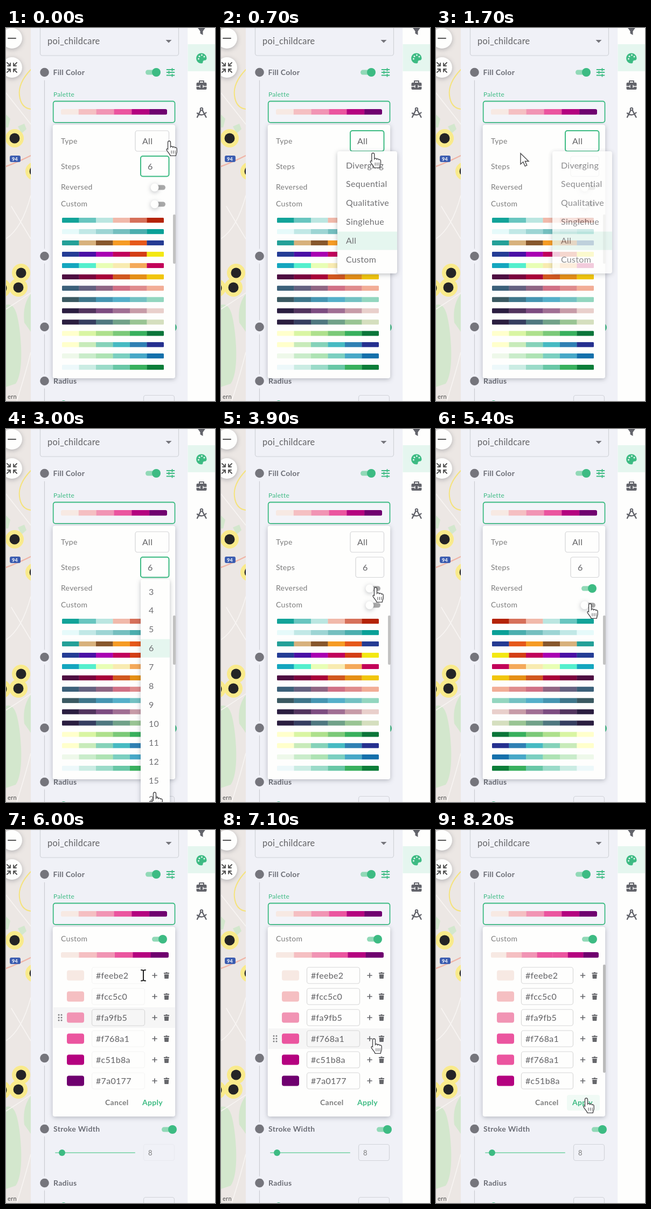
Recreate the animation shown at these times as an HTML page. Size 388x690 px, loop 8.4 s.

```html
<!DOCTYPE html>
<html lang="en">
<head>
<meta charset="utf-8">
<title>Palette picker</title>
<style>
html, body { margin: 0; width: 100%; height: 100%; overflow: hidden; background: #fefefd; }
svg { display: block; width: 388px; height: 690px; font: 16px Lato, "Open Sans", sans-serif; letter-spacing: .3px; }
.card { fill: #fefefd; filter: drop-shadow(0 2px 4px rgba(40, 45, 60, .3)); }
.line { fill: none; stroke-linecap: round; stroke-linejoin: round; }
</style>
</head>
<body>
<svg id="stage" viewBox="0 0 388 690"></svg>
<script>
const LOOP = 8400, STEP = 100;
const GREEN = '#3dbb83', MINT = '#e5f6ef', GREY = '#75757c', LABEL = '#7d7d7d', INK = '#626265', EDGE = '#d3d4d6';

const PINKS = ['#f7e9e3', '#f5bfc2', '#f194b4', '#eb559f', '#b4027f', '#6f006f'];
const HEX = ['#feebe2', '#fcc5c0', '#fa9fb5', '#f768a1', '#c51b8a', '#7a0177'];
const PALETTES = `
12a399 68c5bf bbe6e1 f1b9aa d6705a b42307
e6fafa c1e8e6 9dd5d4 75bfbf 4baeae 0aa097
24a098 d7b17c 87572c f69b24 e6581a 253b92
243c95 4a10a5 a900b2 c1005b d43e16 f3e813
14a6be 54efcd e8feb5 f8ebb1 f4a95a c20058
4d0d41 7a003d a80039 d0571f e58f15 f1c50c
3b6079 646180 8f6583 d07085 df8b8c f2ad96
3b5961 3e768a 4595b1 54afc9 73c1c2 93d6bf
2a1d3f 51335d 7c4b80 a06e93 c79ba7 e9cfcb
2a1d3f 363e60 4f777f 70a188 99c493 d5dfbe
ffffcc d9f5a3 aee08c 7bc978 38b05d 0b7539
ffffcc c8ebba 85d2b9 46bac2 2f80b3 25308f
eef8ea c9ecca aee3b4 7bcfc0 47a8c7 1470ab
edf8fa caece3 9adbc8 68c7a6 38b05d 0b7d38`
  .trim().split('\n').map(row => row.split(' ').map(c => '#' + c));

const attrs = o => Object.entries(o).map(([k, v]) => `${k}="${v}"`).join(' ');
const rect = (x, y, width, height, o) => `<rect ${attrs({ x, y, width, height, ...o })}/>`;
const circle = (cx, cy, r, fill) => `<circle ${attrs({ cx, cy, r, fill })}/>`;
const path = (d, o) => `<path ${attrs({ d, ...o })}/>`;
const stroke = (d, color, width) => path(d, { class: 'line', stroke: color, 'stroke-width': width });
const text = (x, y, s, size = 16, fill = INK, weight = 400) =>
  `<text ${attrs({ x, y, 'font-size': size, fill, 'font-weight': weight })}>${s}</text>`;
const group = (id, ...parts) => `<g id="${id}">${parts.join('')}</g>`;
const box = (x, y, w, h, color = EDGE, width = 1.2) =>
  rect(x, y, w, h, { rx: 4, fill: 'none', stroke: color, 'stroke-width': width });

function bar(x, y, w, h, colors, clip) {
  const s = w / colors.length;
  return `<g clip-path="url(#${clip})">` +
    colors.map((c, i) => rect(x + i * s, y, s + .3, h, { fill: c })).join('') + '</g>';
}
const toggle = (cx, cy, on) => on
  ? rect(cx - 14, cy - 4.5, 26, 9, { rx: 4.5, fill: '#91d9b7' }) + circle(cx + 6, cy, 8, GREEN)
  : rect(cx - 9, cy - 4.5, 22, 9, { rx: 4.5, fill: '#a9a9a9' }) +
    `<circle cx="${cx - 7}" cy="${cy}" r="7.5" class="card"/>`;
const marker = (x, y) => circle(x, y, 17, '#f9ea8b') + circle(x, y, 9.5, '#242426');

function mapView() {
  return rect(0, 0, 46, 690, { fill: '#ece7e4' }) +
    path('M0 512Q14 508 20 530T28 590Q30 640 18 658L0 664ZM46 492Q30 512 34 545L46 562ZM0 160l8 8-4 16H0ZM22 182l12-5 4 10-9 8Z', { fill: '#d3e7cd' }) +
    stroke('M0 120Q24 150 46 178M10 330L46 390M0 390Q30 370 46 310M0 520Q24 505 46 490M20 690Q36 640 46 600', '#f8f5f3', 1.5) +
    stroke('M46 77Q22 102 25 125T46 150', '#f5e37c', 2) +
    stroke('M0 256Q22 248 46 236', '#efb5a8', 2.5) +
    marker(16, 204) + marker(53, 265) + marker(28, 453) + marker(-8, 481) + marker(23, 480) +
    rect(7, 236, 20, 12, { rx: 3, fill: '#3c5db0' }) + text(11, 245.5, '94', 9, '#fff', 700) +
    text(3, 686, 'ern', 11, '#4c4c4c') +
    '<circle class="card" cx="11" cy="19" r="19"/><circle class="card" cx="11" cy="73" r="19"/>' +
    stroke('M4 19H18', '#555', 2) +
    stroke('M2 64l6 6m0-5v5H3M20 64l-6 6m0-5v5h5M2 82l6-6m0 5v-5H3M20 82l-6-6m0 5v-5h5', '#555', 2);
}

function sidebar() {
  const bullets = [82, 422, 553, 653].map(y => circle(71.5, y, 8.3, GREY)).join('');
  return rect(46, 0, 291.5, 690, { fill: '#f0f1f7' }) +
    box(63.5, -20, 257, 71, '#cfd1d8') + text(77, 30, 'poi_childcare', 16.3) +
    path('M296.500 22h11l-5.500 5.500z', { fill: GREY }) +
    stroke('M71.500 97V408M71.500 436V540M71.500 567V640M71.500 667V690', '#c9cad1', 1.2) + bullets +
    text(87.5, 87, 'Fill Color', 14, '#6c6e76', 700) + toggle(273, 82, true) +
    stroke('M298.500 77h14M298.500 82h14M298.500 87.500h14M308.500 74.800v4.400M302.500 79.800v4.400M308.500 85.300v4.400', GREEN, 1.8) +
    text(88, 127, 'Palette', 12, GREEN) +
    rect(87.7, 135.5, 225.8, 39.3, { rx: 4, fill: '#f3f4f9', stroke: GREEN, 'stroke-width': 1.8 }) +
    bar(102, 150, 197, 10.5, PINKS, 'clipField') +
    text(88, 558, 'Stroke Width', 14, '#6c6e76', 700) + toggle(303, 554, true) +
    stroke('M92 597H239', '#91d9b7', 2) + circle(104, 597, 6, GREEN) +
    group('sizeBox', box(255.5, 581.5, 57, 30, '#d2d4da')) + text(264, 602, '8', 13, LABEL) +
    text(88, 658, 'Radius', 14, '#6c6e76', 700) +
    circle(107, 695, 6, GREEN) + box(255.5, 679.5, 57, 30, '#d2d4da');
}

function rail() {
  return rect(337.5, 0, 51, 690, { fill: '#fefefd' }) + rect(337.5, 30, 51, 50, { fill: MINT }) +
    path('M354-3h18l-6.500 9v7l-5-3V6z', { fill: '#62636a' }) +
    path('M363 46.500c-13 0-13 19 0 19 3.500 0 2-3 3-4.500 1.500-2 6.500 0 6.500-5 0-5-4-9.500-9.500-9.500z', { fill: GREEN }) +
    [[357.5, 57], [359, 52.5], [363.5, 50], [368, 53]].map(p => circle(...p, 1.5, MINT)).join('') +
    rect(353.5, 101, 19, 13, { rx: 2, fill: '#62636a' }) +
    stroke('M359 101v-3h8v3', '#62636a', 2) +
    stroke('M353 108h7m6 0h7M360 106v4M366 106v4', '#fefefd', 1.3) +
    stroke('M361.500 152l-6.500 13M364.500 152l7 13M355 157.500q8 7 16.500-1', '#62636a', 2.4) +
    circle(363, 150, 3.2, '#62636a') + circle(363, 150, 1.2, '#fefefd');
}

function palettePopup() {
  const bars = flip => PALETTES.map((p, i) =>
    bar(104, 351 + i * 20.92, 189, 9.5, flip ? [...p].reverse() : p, 'clipList')).join('');
  return rect(86.7, 179, 227.5, 469, { rx: 4, class: 'card' }) +
    text(102, 214, 'Type', 14, LABEL) + box(240, 190, 62.5, 38) +
    group('typeFocus', box(240, 190, 62.5, 38, GREEN, 2)) + text(253, 215, 'All') +
    text(102, 261, 'Steps', 14, LABEL) + box(250, 237, 52.5, 37.5) +
    group('stepsFocus', box(250, 237, 52.5, 37.5, GREEN, 2)) + text(263, 261.5, '6') +
    text(102, 299, 'Reversed', 14, LABEL) + text(102, 330, 'Custom', 14, LABEL) +
    group('normal', toggle(283, 295, false), bars(false)) +
    group('reversed', toggle(284, 295, true), bars(true)) +
    toggle(283, 326, false) + rect(310, 345, 5, 91, { rx: 2, fill: '#c2c2c2' });
}

function colorRows(order, dx, fieldClass) {
  return order.map((k, i) => {
    const y = 269 + i * 39, px = 276 - dx * 3.5, tx = 298 - dx * 3.5;
    return rect(113, y - 9.5, 32, 19, { rx: 4, fill: PINKS[k] }) +
      `<g class="${fieldClass}">` + box(159.5 - dx, y - 15, 98 - dx * 2, 30, '#d8d8d8') + '</g>' +
      text(167 - dx, y + 5.5, HEX[k]) +
      stroke(`M${px - 4} ${y}h8m-4-4v8`, '#66676b', 1.7) +
      path(`M${tx - 5} ${y - 5}h3l1-1h2l1 1h3v2h-10zM${tx - 4.3} ${y - 2}h8.600l-.6 8h-7.400z`, { fill: '#66676b' });
  }).join('');
}

function customPopup() {
  const added = [0, 1, 2, 3, 3, 4], dots = [];
  for (let i = 0; i < 6; i++) dots.push(circle(98 + i % 2 * 5, -5 + (i >> 1) * 5, 1.5, '#808083'));
  return rect(86.7, 179, 227.5, 351, { rx: 4, class: 'card' }) +
    text(102, 206, 'Custom', 14, LABEL) + toggle(285, 202, true) +
    group('rowHover', rect(88, -19, 226, 38, { fill: '#f6f6f6' }), ...dots) +
    group('six', bar(102, 226, 200, 10.5, PINKS, 'clipCustom'), colorRows([0, 1, 2, 3, 4, 5], 0, 'field')) +
    group('seven', bar(102, 226, 200, 10.5, [...added, 5].map(k => PINKS[k]), 'clipCustom'),
      colorRows(added, 1, 'fieldAdded'), rect(310, 249, 5, 200, { rx: 2, fill: '#bababa' })) +
    group('applyHover', rect(243, 490, 61, 29, { rx: 4, fill: '#f0faf5' })) +
    text(184, 509, 'Cancel', 14, LABEL, 700) + text(253, 509, 'Apply', 14, GREEN, 700);
}

function menu(x, y, w, h, labels, chosen, tx, ty, gap) {
  return rect(x, y, w, h, { rx: 4, class: 'card' }) +
    rect(x, ty + chosen * gap - 17, w, 34, { fill: MINT }) +
    labels.map((s, i) => text(tx, ty + i * gap + 5.5, s, 16, '#707073')).join('');
}

const CURSORS = {
  hand: path('M-1.500 2c0-4 5-4 5 0v8c1-1.600 4-1.200 4.300.6 1-1.400 3.600-.8 4 .8 1.200-1 3.400 0 3.400 2v5c0 3-1.500 4-2 8H3c-.5-3-4-6-6.500-10-1.300-2.400.6-4 2-2.400z',
    { fill: '#fff', stroke: '#4a4a4c', 'stroke-width': 1.4 }) + stroke('M5 17v5M8.500 17v5M12 17v5', '#4a4a4c', 1),
  arrow: path('M0 0V20l4.800-4.400 3.500 8 3.500-1.600-3.500-7.500h6.700z', { fill: '#fff', stroke: '#4a4a4c', 'stroke-width': 1.4 }),
  beam: stroke('M-4-10q4 0 4 2 0-2 4-2M0-8V8M-4 10q4 0 4-2 0 2 4 2', '#222', 2)
};

const clip = (id, content) => `<clipPath id="${id}">${content}</clipPath>`;
const $ = id => document.getElementById(id);
$('stage').innerHTML = '<defs>' +
  clip('clipField', rect(102, 150, 197, 10.5, { rx: 3 })) +
  clip('clipCustom', rect(102, 226, 200, 10.5, { rx: 3 })) +
  clip('clipList', PALETTES.map((p, i) => rect(104, 351 + i * 20.92, 189, 9.5, { rx: 1.5 })).join('')) +
  '</defs>' + mapView() + sidebar() + rail() +
  group('palettes', palettePopup()) + group('custom', customPopup()) +
  group('typeMenu', menu(216, 228, 111, 226, ['Diverging', 'Sequential', 'Qualitative', 'Singlehue', 'All', 'Custom'], 4, 232, 254, 34.9)) +
  group('stepsMenu', menu(250, 278, 54, 440, [3, 4, 5, 6, 7, 8, 9, 10, 11, 12, 15, 20], 3, 265, 301, 34.9)) +
  group('cursor', ...Object.entries(CURSORS).map(([k, s]) => group(k, s)));

// time, x, y, pointer shape
const POINTER = [
  [0, 302, 210, 'hand'], [300, 290, 210, 'hand'], [600, 288, 212, 'hand'], [900, 262, 290, 'hand'],
  [1300, 258, 390, 'hand'], [1450, 220, 320, 'arrow'], [1700, 157, 232, 'arrow'], [2100, 157, 232, 'arrow'],
  [2400, 275, 252, 'hand'], [2600, 275, 260, 'hand'], [3000, 275, 673, 'hand'], [3300, 275, 672, 'hand'],
  [3900, 286, 294, 'hand'], [4900, 287, 294, 'hand'], [5200, 285, 324, 'hand'], [5600, 285, 324, 'hand'],
  [5800, 272, 300, 'arrow'], [5900, 260, 275, 'beam'], [6000, 255, 269, 'beam'], [6300, 255, 272, 'beam'],
  [6500, 262, 310, 'hand'], [7000, 283, 387, 'hand'], [7600, 283, 387, 'hand'], [8000, 278, 497, 'hand'],
  [8400, 278, 497, 'hand']
];
const FADES = {
  typeMenu: [[500, 0], [700, 1], [1600, 1], [1700, .8], [1800, 0]],
  stepsMenu: [[2500, 0], [2700, 1], [3300, 1], [3500, 0]],
  custom: [[5500, 0], [5700, 1]],
  palettes: [[5500, 1], [5700, 0]],
  sizeBox: [[5700, 0], [6000, .25], [6300, 1]]
};

function locate(table, t) {
  const i = table.findIndex(k => k[0] > t);
  if (i === 0) return [table[0], table[0], 0];
  if (i < 0) return [table.at(-1), table.at(-1), 0];
  const a = table[i - 1], b = table[i];
  return [a, b, (t - a[0]) / (b[0] - a[0])];
}
const mix = ([a, b, p], n) => a[n] + (b[n] - a[n]) * p;
const fade = (el, v) => { el.style.opacity = v; el.style.display = v > 0 ? '' : 'none'; };
const show = (id, on) => fade($(id), on ? 1 : 0);

function render(t) {
  for (const id in FADES) fade($(id), mix(locate(FADES[id], t), 1));
  const size = mix(locate(FADES.sizeBox, t), 1);
  document.querySelectorAll('.field').forEach((el, i) => fade(el, i === 2 ? 1 : size));

  show('typeFocus', t >= 500 && t < 2400);
  show('stepsFocus', t < 500 || t >= 2400 && t < 3500);
  const flipped = t >= 4200;
  show('normal', !flipped);
  show('reversed', flipped);
  const added = t >= 7300;
  show('six', !added);
  show('seven', added);

  const spot = locate(POINTER, t), shape = spot[0][3];
  const smooth = [spot[0], spot[1], spot[2] * spot[2] * (3 - 2 * spot[2])];
  const x = mix(smooth, 1), y = mix(smooth, 2);
  $('cursor').setAttribute('transform', `translate(${x} ${y})`);
  for (const k in CURSORS) show(k, k === shape);

  const row = t < 6200 ? 2 : Math.round((y - 269) / 39);
  show('rowHover', row < 6);
  $('rowHover').setAttribute('transform', `translate(0 ${269 + row * 39})`);
  show('applyHover', y > 485);
}

const start = performance.now();
function tick() {
  const t = (performance.now() - start) % LOOP;
  render(Math.floor(t / STEP) * STEP);
  requestAnimationFrame(tick);
}
tick();
</script>
</body>
</html>
```
